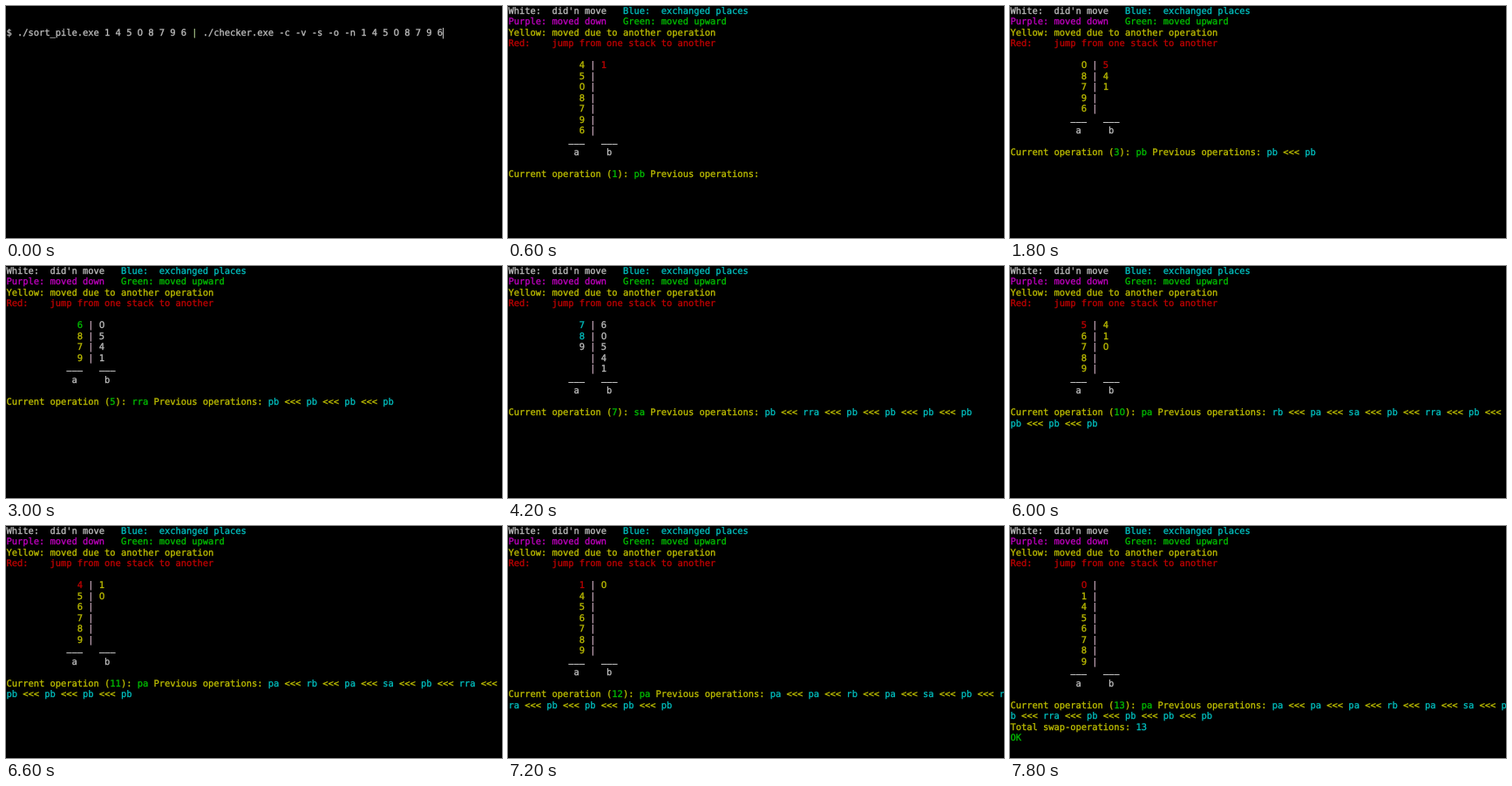
These frames come from a looping animation (569 by 266 pixels, 9600 ms). An HTML page with a canvas:

```html
<!DOCTYPE html>
<html lang="en">
<head>
<meta charset="utf-8">
<title>Two stack sort</title>
<style>
  html, body { margin: 0; width: 100%; height: 100%; overflow: hidden; background: #000; }
  canvas { display: block; }
</style>
</head>
<body>
<canvas id="term" width="569" height="266"></canvas>
<script>
const ctx = document.getElementById('term').getContext('2d');

const STEP = 600, LOOP = 9600;
const COLS = 91, CELL_W = 6.256, CELL_H = 12.5, LEFT = 0.5, BASE = 8.6, WEIGHT = 0.3;
const MONO = '10.4px "DejaVu Sans Mono", monospace';
const PLAIN = '10.4px "DejaVu Sans", sans-serif';

const WHITE = '#bfbfbf', CYAN = '#00bfbf', PURPLE = '#bf00bf', GREEN = '#00bf00',
      YELLOW = '#bfbf00', RED = '#bf0000', BAR = '#c9a8bc', PIPE = '#a4bf86';

const START = [1, 4, 5, 0, 8, 7, 9, 6];
const OPS = 'pb pb pb pb rra pb sa pa rb pa pa pa pa'.split(' ');

const cell = (value, color) => ({ value, color });
const paint = (stack, color) => stack.forEach(c => { c.color = color; });

function apply(op, a, b) {
  const all = [...a, ...b];
  paint(all, WHITE);
  if (op[0] === 'p') {
    const [from, to] = op === 'pa' ? [b, a] : [a, b];
    paint(all, YELLOW);
    from[0].color = RED;
    to.unshift(from.shift());
    return;
  }
  const stack = op.endsWith('a') ? a : b;
  if (op[0] === 's') {
    [stack[0], stack[1]] = [stack[1], stack[0]];
    paint(stack.slice(0, 2), CYAN);
  } else {
    paint(stack, YELLOW);
    if (op.length === 3) {
      stack.unshift(stack.pop());
      stack[0].color = GREEN;
    } else {
      stack.push(stack.shift());
      stack[stack.length - 1].color = PURPLE;
    }
  }
}

function stacksAfter(count) {
  const a = START.map(n => cell(n, WHITE)), b = [];
  OPS.slice(0, count).forEach(op => apply(op, a, b));
  return [a, b];
}

// Writes on the character grid, wraps at the last column, returns the end position.
function write(row, col, ...parts) {
  for (let i = 0; i < parts.length; i += 2) {
    ctx.fillStyle = ctx.strokeStyle = parts[i + 1];
    for (const ch of String(parts[i])) {
      if (col === COLS) { col = 0; row++; }
      const x = LEFT + (col + 0.5) * CELL_W, y = row * CELL_H + BASE;
      if (ch === '_' && row > 2) {
        ctx.fillRect(x - CELL_W / 2, Math.round(y - 0.9), CELL_W, 1);
      } else if (ch !== ' ') {
        ctx.font = ch === '0' ? PLAIN : MONO;
        ctx.fillText(ch, x, y);
        ctx.strokeText(ch, x, y);
      }
      col++;
    }
  }
  return [row, col];
}

function drawPrompt() {
  const nums = START.join(' ');
  const [row, col] = write(2, 0,
    `$ ./sort_pile.exe ${nums} `, WHITE, '|', PIPE,
    ` ./checker.exe -c -v -s -o -n ${nums}`, WHITE);
  ctx.fillRect(Math.round(LEFT + col * CELL_W), row * CELL_H, 1, CELL_H);
}

function drawLegend() {
  write(0, 0, "White:  did'n move   ", WHITE, 'Blue:  exchanged places', CYAN);
  write(1, 0, 'Purple: moved down   ', PURPLE, 'Green: moved upward', GREEN);
  write(2, 0, 'Yellow: moved due to another operation', YELLOW);
  write(3, 0, 'Red:    jump from one stack to another', RED);
}

function drawStacks(a, b) {
  const height = Math.max(a.length, b.length);
  for (let i = 0; i < height; i++) {
    const row = 5 + i;
    if (a[i]) write(row, 13, a[i].value, a[i].color);
    write(row, 15, '|', BAR);
    if (b[i]) write(row, 17, b[i].value, b[i].color);
  }
  write(5 + height, 11, '___   ___', WHITE);
  write(6 + height, 12, 'a     b', WHITE);
  return 8 + height;
}

function drawStep(count) {
  drawLegend();
  const line = drawStacks(...stacksAfter(count));
  const past = OPS.slice(0, count - 1).reverse();
  const history = past.flatMap((op, i) => i ? [' <<< ', YELLOW, op, CYAN] : [op, CYAN]);
  const [row] = write(line, 0,
    'Current operation (', YELLOW, count, GREEN, '): ', YELLOW,
    OPS[count - 1], GREEN, ' Previous operations: ', YELLOW, ...history);
  if (count === OPS.length) {
    write(row + 1, 0, 'Total swap-operations: ', YELLOW, count, CYAN);
    write(row + 2, 0, 'OK', GREEN);
  }
}

function draw(count) {
  ctx.fillStyle = '#000';
  ctx.fillRect(0, 0, 569, 266);
  ctx.textAlign = 'center';
  ctx.textRendering = 'geometricPrecision';
  ctx.lineWidth = WEIGHT;
  if (count) drawStep(count); else drawPrompt();
}

let shown = -1;
function tick() {
  const count = Math.min(OPS.length, Math.floor(performance.now() % LOOP / STEP));
  if (count !== shown) draw(shown = count);
  requestAnimationFrame(tick);
}
tick();
</script>
</body>
</html>
```
